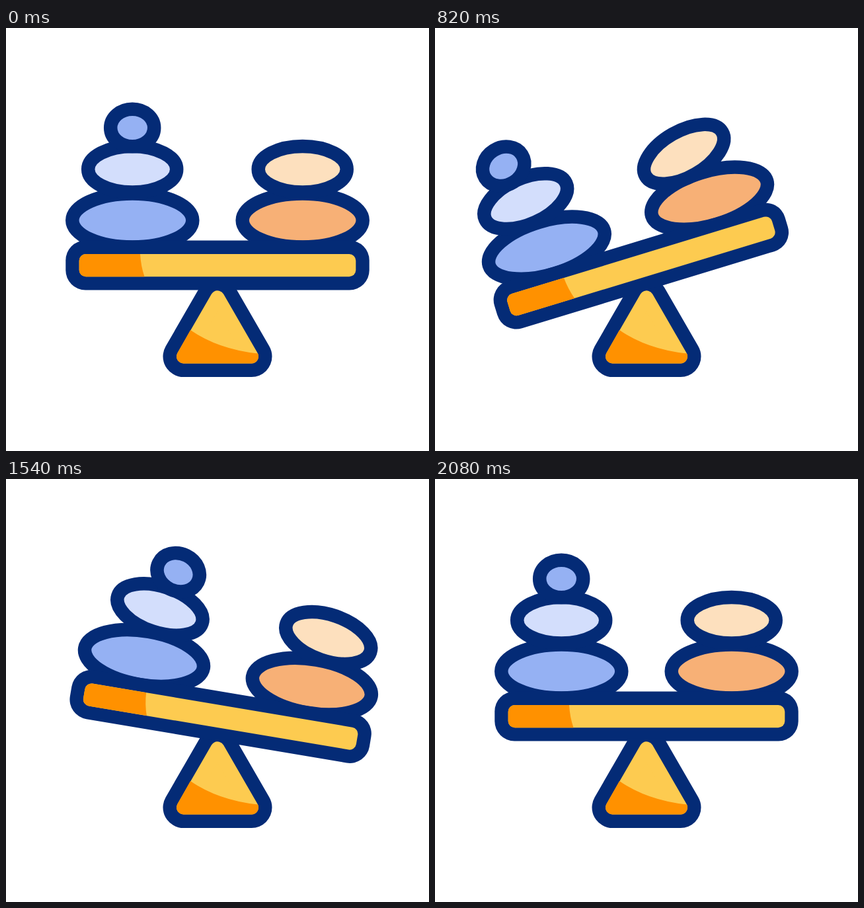
An HTML page that plays this animation: 640x640 px, repeating every 2400 ms.

```html
<!DOCTYPE html>
<html lang="en">
<head>
<meta charset="utf-8">
<title>Balance</title>
<style>
  html, body { margin: 0; width: 100%; height: 100%; overflow: hidden; background: #fff; }
  svg { display: block; width: 100vw; height: 100vh; }
  ellipse { stroke: #042b76; stroke-width: 20.5; }
</style>
</head>
<body>
<svg viewBox="0 0 640 640">
  <!-- fulcrum: the same triangle stroked wide, then narrow -->
  <g stroke-linejoin="round">
    <path d="M268.5 497H371.5L320 407.8Z" fill="#042b76" stroke="#042b76" stroke-width="62"/>
    <path d="M268.5 497H371.5L320 407.8Z" fill="#fdcb50" stroke="#fdcb50" stroke-width="21"/>
  </g>
  <path d="M279 457Q321 486 381.1 492.6A10.5 10.5 0 0 1 371.5 507.5H268.5A10.5 10.5 0 0 1 259.4 491.8Z" fill="#ff9100"/>

  <g id="beam">
    <ellipse cx="191.3" cy="291" rx="91" ry="40.6" fill="#95b1f3"/>
    <g id="leftMid">
      <ellipse cx="191.2" cy="213.7" rx="67" ry="34.8" fill="#d3defc"/>
      <g id="leftTop">
        <ellipse cx="191.2" cy="151" rx="33" ry="28.3" fill="#95b1f3"/>
      </g>
    </g>
    <ellipse cx="448.7" cy="291" rx="91" ry="40.6" fill="#f7b076"/>
    <g id="rightMid">
      <ellipse cx="448.7" cy="213.7" rx="67" ry="34.8" fill="#fde0be"/>
    </g>
    <rect x="90.3" y="321.5" width="459.4" height="75" rx="30" fill="#042b76"/>
    <rect x="110.7" y="342" width="418.6" height="34.3" rx="10" fill="#fdcb50"/>
    <path d="M203 342Q204 360 209.5 376.3H120.7A10 10 0 0 1 110.7 366.3V352A10 10 0 0 1 120.7 342Z" fill="#ff9100"/>
  </g>
</svg>
<script>
  const LOOP = 2400;
  const KEYS = [0, 720, 1400, 2080];

  // Angles at each key time, with the pivot of each part
  const parts = [
    { id: 'beam', x: 320, y: 387, angles: [0, -17.3, 9.9, 0] },
    { id: 'leftMid', x: 191.2, y: 291, angles: [0, -7.4, 8.9, 0] },
    { id: 'leftTop', x: 191.2, y: 213.7, angles: [0, -8.5, 8.4, 0], shrinks: true },
    { id: 'rightMid', x: 448.7, y: 291, angles: [0, -13.3, 9.6, 0], shrinks: true }
  ];
  for (const p of parts) p.el = document.getElementById(p.id);

  const ease = t => t < .5 ? 4 * t ** 3 : 1 - 4 * (1 - t) ** 3;

  function draw(now) {
    const time = now % LOOP;
    const i = time < KEYS[1] ? 0 : time < KEYS[2] ? 1 : 2;
    const e = ease(Math.min(1, (time - KEYS[i]) / (KEYS[i + 1] - KEYS[i])));
    for (const { el, x, y, angles, shrinks } of parts) {
      const angle = angles[i] + (angles[i + 1] - angles[i]) * e;
      // Loose stones shrink slightly while swinging across
      const scale = shrinks && i === 1 ? 1 - .14 * e * (1 - e) : 1;
      el.setAttribute('transform',
        `translate(${x} ${y}) rotate(${angle}) scale(${scale}) translate(${-x} ${-y})`);
    }
  }

  const start = performance.now();
  function tick() {
    draw(performance.now() - start);
    requestAnimationFrame(tick);
  }
  tick();
</script>
</body>
</html>
```
